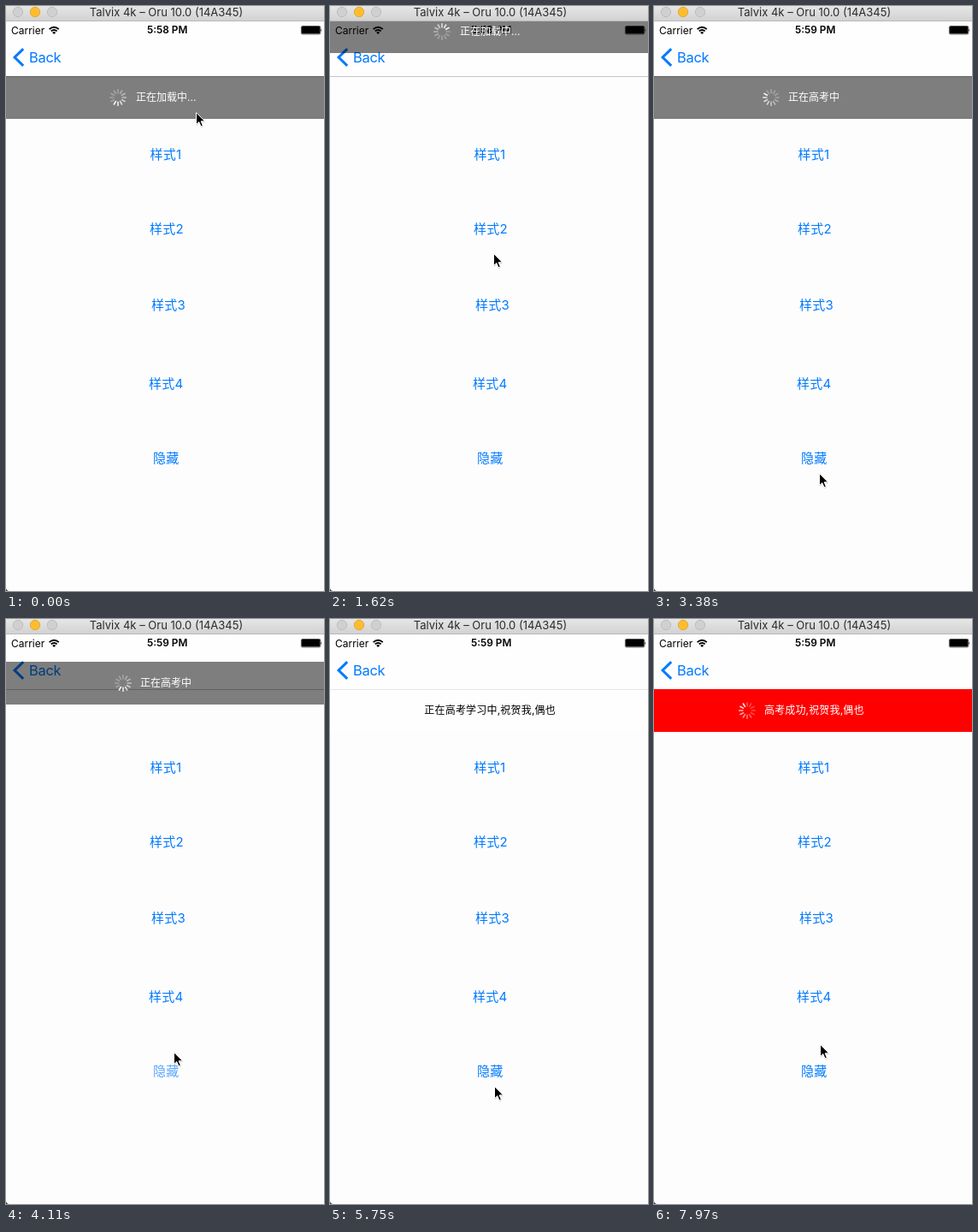
Recreate the animation shown at these times as an HTML page. Size 372 px wide and 684 px high, loop 8000 ms.

```html
<!DOCTYPE html>
<html lang="zh-CN">
<head>
<meta charset="utf-8">
<title>Loading banner demo</title>
<style>
html, body { margin: 0; width: 100%; height: 100%; overflow: hidden; background: #fdfdfd; }
svg { display: block; width: 372px; height: 684px; }
text { font-family: Inter, "Noto Sans CJK SC", "Noto Sans CJK", sans-serif; white-space: pre; }
.link { font-size: 15px; letter-spacing: .2px; fill: #007aff; }
.small { font-size: 12px; }
</style>
</head>
<body>
<svg viewBox="0 0 372 684">
  <defs>
    <linearGradient id="bar" x1="0" y1="0" x2="0" y2="1">
      <stop stop-color="#e6e6e6"/><stop offset="1" stop-color="#d1d1d1"/>
    </linearGradient>
  </defs>
  <rect width="372" height="684" fill="#fdfdfd"/>
  <path d="M0 681Q.5 683.5 3 684H0z" fill="#333"/>
  <g id="buttons"></g>

  <rect y="18" width="372" height="64" fill="#fefefe"/>
  <rect y="82" width="372" height="1" fill="#c6c6c8"/>
  <text class="small" x="6" y="32.7">Carrier</text>
  <g fill="none" stroke="#000" stroke-width="1.9">
    <path d="M50.6 27.1Q56.2 22.2 61.8 27.1M52.7 29.4Q56.2 26.4 59.7 29.4"/>
    <path d="M54.2 30.9Q56.2 29.2 58.2 30.9L56.2 32.9z" fill="#000" stroke="none"/>
  </g>
  <text id="clock" x="188.7" y="32.4" text-anchor="middle" font-size="11.8" font-weight="600"></text>
  <rect x="345.4" y="23.5" width="22.4" height="9.4" rx="1.5" fill="none" stroke="#000" stroke-width=".7"/>
  <rect x="346" y="24.1" width="21.2" height="8.2" rx=".8"/>
  <path d="M368.4 26.4q1.7 1.8 0 3.6z"/>
  <path d="M20.2 50.2L10.1 60L20.2 69.8" fill="none" stroke="#007aff" stroke-width="3"/>
  <text x="27" y="65.8" font-size="16.5" letter-spacing="-.3" fill="#007aff">Back</text>

  <g id="banner">
    <rect id="fill" width="372" height="50"/>
    <g id="spinner"></g>
    <text id="message" y="29.1" font-size="12"></text>
  </g>

  <rect width="372" height="18" fill="url(#bar)"/>
  <rect y="17" width="372" height="1" fill="#b9b9b9"/>
  <g stroke-width=".8">
    <circle cx="14" cy="7" r="5.7" fill="#d0d0d0" stroke="#b7b7b7"/>
    <circle cx="34" cy="7" r="5.7" fill="#fdbd2f" stroke="#dfa023"/>
    <circle cx="54" cy="7" r="5.7" fill="#d0d0d0" stroke="#b7b7b7"/>
  </g>
  <text x="187.5" y="11.8" text-anchor="middle" font-size="13" fill="#2a2a2a">Talvix 4k – Oru 10.0 (14A345)</text>

  <g id="cursor">
    <path d="M.6 1.8V16.2L4 13.2L6.2 18.2L9 17L6.9 12.2H11.4z" fill="#000" opacity=".16"/>
    <path d="M.5.6V14.6L3.8 11.6L6 16.8L8.3 15.8L6.1 10.8H10.6z" stroke="#fff" stroke-width="1" stroke-linejoin="round"/>
  </g>
</svg>
<script>
const LOOP = 8000, STEP = 147.5, SLIDE = 400, FADE = 250, HIDDEN = -32, SHOWN = 82;
const NS = 'http://www.w3.org/2000/svg';
const $ = id => document.getElementById(id);

function add(parent, tag, attrs, text = '') {
  const el = document.createElementNS(NS, tag);
  for (const key in attrs) el.setAttribute(key, attrs[key]);
  el.textContent = text;
  parent.append(el);
  return el;
}

const banners = [
  { show: -1000, hide: 1377, fill: 'rgba(0,0,0,.5)', ink: '#fff', text: '正在加载中...', x: 152, spin: 131, phase: 7 },
  { show: 2205, hide: 3988, fill: 'rgba(0,0,0,.5)', ink: '#fff', text: '正在高考中', x: 157, spin: 137, phase: 6 },
  { show: 4740, hide: 6770, fill: 'rgba(255,255,255,.55)', ink: '#000', text: '正在高考学习中,祝贺我,偶也', x: 110.3, gap: .2 },
  { show: 7401, hide: 9000, fill: '#f00', ink: '#fff', text: '高考成功,祝贺我,偶也', x: 129, gap: .15, spin: 109, phase: 0 }
];

// each banner is opened by its own button and closed by the last one
const buttons = [
  { label: '样式1', x: 168.5, y: 179 },
  { label: '样式2', x: 168, y: 266 },
  { label: '样式3', x: 170, y: 355 },
  { label: '样式4', x: 167, y: 447 },
  { label: '隐藏', x: 172, y: 534 }
];
buttons.forEach((b, i) => {
  b.taps = banners[i] ? [banners[i].show] : banners.map(banner => banner.hide);
  b.el = add($('buttons'), 'text', { class: 'link', x: b.x, y: b.y }, b.label);
});

const spokes = Array.from({ length: 12 }, (_, i) => add($('spinner'), 'path', {
  d: 'M0-5.3V-9.2', stroke: '#fff', 'stroke-width': 1.7, 'stroke-linecap': 'round',
  transform: `rotate(${i * 30})`
}));

// time, x, y of the pointer tip
const route = [
  [0, 222, 124], [150, 221, 130], [900, 196, 505], [1180, 194, 524], [1376, 194, 520],
  [1620, 191, 289], [1920, 190, 262], [2214, 190, 262], [2507, 188.5, 423],
  [2950, 193, 546], [3400, 193, 546], [3900, 196, 519], [4130, 196, 506],
  [4600, 192, 352], [4860, 192, 352], [5600, 192, 537], [5750, 192, 546],
  [6080, 229, 532], [6460, 196, 523], [6800, 196, 523], [7250, 193, 441],
  [7530, 193, 441], [7820, 195, 485], [7965, 194, 497], [8000, 194, 497]
];

const clamp = v => Math.max(0, Math.min(1, v));
const ease = v => (1 - Math.cos(Math.PI * clamp(v))) / 2;

function pointer(t) {
  const i = Math.max(1, route.findIndex(p => p[0] >= t));
  const [a, b] = [route[i - 1], route[i]];
  const k = ease((t - a[0]) / (b[0] - a[0]));
  return [a[1] + (b[1] - a[1]) * k, a[2] + (b[2] - a[2]) * k];
}

function drawBanner(t) {
  const b = banners.filter(b => t >= b.show).pop();
  const open = ease((t - b.show) / SLIDE) - ease((t - b.hide) / SLIDE);
  $('banner').setAttribute('transform', `translate(0 ${Math.round(HIDDEN + (SHOWN - HIDDEN) * open)})`);
  $('fill').setAttribute('fill', b.fill);

  const message = $('message');
  message.textContent = b.text;
  message.setAttribute('x', b.x);
  message.setAttribute('fill', b.ink);
  message.setAttribute('letter-spacing', b.gap || 0);

  $('spinner').setAttribute('visibility', b.spin ? 'visible' : 'hidden');
  if (!b.spin) return;
  $('spinner').setAttribute('transform', `translate(${b.spin} 25)`);
  const head = Math.floor(t * 12 / 1000) + b.phase;
  spokes.forEach((el, i) => {
    const age = (head - i + 120) % 12;
    el.setAttribute('opacity', Math.max(.28, .9 - age * .09));
  });
}

function drawButtons(t) {
  for (const b of buttons) {
    const age = Math.min(...b.taps.map(tap => t - tap).filter(a => a >= 0), FADE);
    b.el.setAttribute('opacity', .2 + .8 * age / FADE);
  }
}

function render(now) {
  // each picture is held for one step
  const t = Math.floor((now % LOOP + 22) / STEP) * STEP;
  drawBanner(t);
  drawButtons(t);
  $('clock').textContent = t < 2200 ? '5:58 PM' : '5:59 PM';
  $('cursor').setAttribute('transform', `translate(${pointer(t)})`);
}

let start;
function tick(now) {
  start ??= now;
  render(now - start);
  requestAnimationFrame(tick);
}
render(0);
requestAnimationFrame(tick);
</script>
</body>
</html>
```
